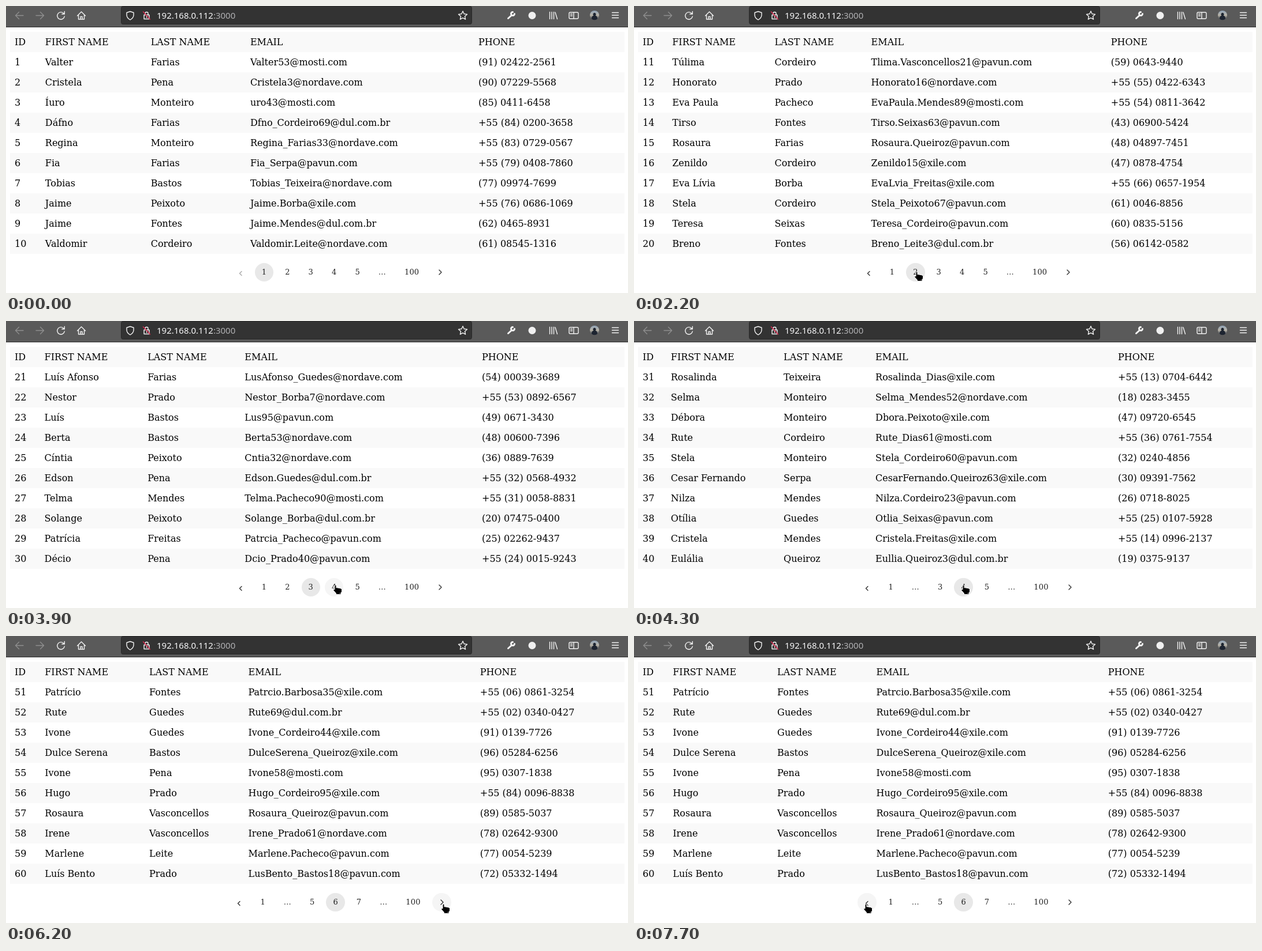
Animation, 1077 px wide and 498 px high, one loop 8000 ms. Source, as an HTML page:

```html
<!DOCTYPE html>
<html lang="en">
<head>
<meta charset="utf-8">
<title>Paginated table</title>
<style>
  html, body { margin: 0; width: 100%; height: 100%; overflow: hidden; background: #fff; }
  body { position: relative; font: 16px "DejaVu Serif", serif; color: #000; }
  body > * { position: absolute; }
  svg { display: block; overflow: visible; }
  #bar { left: 0; top: 0; }
  .line, #pager path { fill: none; stroke: #f2f2f2; stroke-width: 1.4; stroke-linecap: round; stroke-linejoin: round; }
  .dim { stroke: #8e8e8e; }
  #url { left: 261px; top: 6px; font: 15px/20px "Noto Sans", "Open Sans", sans-serif; color: #f9f9fa; }
  #url span { color: #b1b1b3; }
  table { left: 7px; top: 45px; width: 1064px; border-spacing: 0; }
  td { height: 35px; padding: 0 8px; line-height: 19px; white-space: nowrap; }
  tr:nth-child(odd) { background: #f9f9f9; }
  #pager { left: 81px; right: 0; top: 446px; display: flex; justify-content: center; }
  #pager span {
    height: 32px; margin: 0 4px; padding: 0 12px; border-radius: 16px;
    font-size: 13px; line-height: 31px; letter-spacing: .14px; color: #212121;
  }
  #pager .hover { background: #f5f5f5; }
  #pager .current { background: #e8e8e8; }
  #pager path { stroke: #333; }
  #pager .off path { stroke: #a8a8a8; }
  #pointer { left: 0; top: 0; }
</style>
</head>
<body>
<svg id="bar" width="1077" height="37">
  <defs>
    <linearGradient id="photo" x2="0" y2="1">
      <stop stop-color="#8fa3b8"/><stop offset=".5" stop-color="#b9b4a8"/><stop offset="1" stop-color="#2b3444"/>
    </linearGradient>
  </defs>
  <rect width="1077" height="37" fill="#5a5a5a"/>
  <rect y="36" width="1077" height="1" fill="#2c2c2c"/>
  <rect x="199.5" y=".5" width="607" height="31" rx="3" fill="#333" stroke="#292929"/>
  <path class="line dim" d="M30 16.5H16.5M22.5 10.5l-6 6 6 6M52 16.5h13.5M59.5 10.5l6 6-6 6"/>
  <!-- reload, home, shield, star -->
  <path class="line" d="M100 13A6.3 6.3 0 1 0 101.3 18M101.3 9.5v4.5h-4.5"/>
  <path class="line" d="M123.5 17l7-7 7 7M125.5 15.5V23h10v-7.5M129 23v-4.5h3V23"/>
  <path class="line" d="M215 9.5l6 2v4c0 4-2.5 6.5-6 8.5-3.5-2-6-4.5-6-8.5v-4z"/>
  <path class="line" d="M791 9l2.2 4.8 5.3.6-4 3.6 1.1 5.2-4.6-2.6-4.6 2.6 1.1-5.2-4-3.6 5.3-.6z"/>
  <!-- struck padlock, wrench -->
  <path class="line" d="M239 15.5h9v7h-9zM241 15v-2a2.5 2.5 0 0 1 5 0v2M243.5 18v2"/>
  <path class="line" style="stroke:#e22850" d="M237.5 10l12 13"/>
  <path class="line" style="stroke-width:3" d="M869.5 21.5l6-5.5M880.5 13.5A3 3 0 1 1 877.5 10.5"/>
  <circle cx="911" cy="16.5" r="6.5" fill="#f0f0f0"/>
  <!-- library, sidebar, menu -->
  <path class="line" d="M941.5 10.5v12m3.5-12v12m3.5-12v12M951 11l3.5 11.5"/>
  <path class="line" d="M977 11h12a2 2 0 0 1 2 2v7a2 2 0 0 1-2 2h-12a2 2 0 0 1-2-2v-7a2 2 0 0 1 2-2zM983 11v11M977.5 14h3m-3 3h3"/>
  <path class="line" d="M1049.5 11.5h11m-11 4.5h11m-11 4.5h11"/>
  <circle cx="1019" cy="16" r="8" fill="url(#photo)"/>
  <path fill="#1d2430" d="M1014 22c0-4 2-5 3.5-5.5a2.5 2.5 0 1 1 3 0c2 .5 3.5 2 3.5 5.5-3 3-7 3-10 0z"/>
</svg>
<div id="url">192.168.0.112<span>:3000</span></div>
<table id="table"></table>
<div id="pager"></div>
<svg id="pointer" width="20" height="20"></svg>
<script>
const LOOP = 8000, STEP = 100, LAST = 100;
const $ = id => document.getElementById(id);
const domains = { m: "mosti.com", v: "nordave.com", p: "pavun.com", x: "xile.com", d: "dul.com.br" };
const phoneForms = { a: "(##) 0###-####", b: "(##) 0####-####", c: "+55 (##) 0###-####" };

// One person per line: first name, last name, email with domain key, phone form
const people = `Valter,Farias,Valter53@m,b
Cristela,Pena,Cristela3@v,b
Íuro,Monteiro,uro43@m,a
Dáfno,Farias,Dfno_Cordeiro69@d,c
Regina,Monteiro,Regina_Farias33@v,c
Fia,Farias,Fia_Serpa@p,c
Tobias,Bastos,Tobias_Teixeira@v,b
Jaime,Peixoto,Jaime.Borba@x,c
Jaime,Fontes,Jaime.Mendes@d,a
Valdomir,Cordeiro,Valdomir.Leite@v,b
Túlima,Cordeiro,Tlima.Vasconcellos21@p,a
Honorato,Prado,Honorato16@v,c
Eva Paula,Pacheco,EvaPaula.Mendes89@m,c
Tirso,Fontes,Tirso.Seixas63@p,b
Rosaura,Farias,Rosaura.Queiroz@p,b
Zenildo,Cordeiro,Zenildo15@x,a
Eva Lívia,Borba,EvaLvia_Freitas@x,c
Stela,Cordeiro,Stela_Peixoto67@p,a
Teresa,Seixas,Teresa_Cordeiro@p,a
Breno,Fontes,Breno_Leite3@d,b
Luís Afonso,Farias,LusAfonso_Guedes@v,b
Nestor,Prado,Nestor_Borba7@v,c
Luís,Bastos,Lus95@p,a
Berta,Bastos,Berta53@v,b
Cíntia,Peixoto,Cntia32@v,a
Edson,Pena,Edson.Guedes@d,c
Telma,Mendes,Telma.Pacheco90@m,c
Solange,Peixoto,Solange_Borba@d,b
Patrícia,Freitas,Patrcia_Pacheco@p,b
Décio,Pena,Dcio_Prado40@p,c
Rosalinda,Teixeira,Rosalinda_Dias@x,c
Selma,Monteiro,Selma_Mendes52@v,a
Débora,Monteiro,Dbora.Peixoto@x,b
Rute,Cordeiro,Rute_Dias61@m,c
Stela,Monteiro,Stela_Cordeiro60@p,a
Cesar Fernando,Serpa,CesarFernando.Queiroz63@x,b
Nilza,Mendes,Nilza.Cordeiro23@p,a
Otília,Guedes,Otlia_Seixas@p,c
Cristela,Mendes,Cristela.Freitas@x,c
Eulália,Queiroz,Eullia.Queiroz3@d,a
Nestor,Pacheco,Nestor.Prado18@p,a
Ivone,Guedes,Ivone_Mendes@v,c
Luís Bento,Fontes,LusBento.Monteiro72@v,b
Teresa,Cordeiro,Teresa44@x,c
Hugo,Peixoto,Hugo_Serpa5@m,a
Solange,Teixeira,Solange.Farias@p,b
Edson,Vasconcellos,Edson_Leite31@d,c
Dulce Serena,Borba,DulceSerena.Freitas89@v,a
Décio,Bastos,Dcio80@v,b
Berta,Pena,Berta.Queiroz@x,c
Patrício,Fontes,Patrcio.Barbosa35@x,c
Rute,Guedes,Rute69@d,c
Ivone,Guedes,Ivone_Cordeiro44@x,a
Dulce Serena,Bastos,DulceSerena_Queiroz@x,b
Ivone,Pena,Ivone58@m,a
Hugo,Prado,Hugo_Cordeiro95@x,c
Rosaura,Vasconcellos,Rosaura_Queiroz@p,a
Irene,Vasconcellos,Irene_Prado61@v,b
Marlene,Leite,Marlene.Pacheco@p,a
Luís Bento,Prado,LusBento_Bastos18@p,b
Telma,Prado,Telma_Seixas27@p,b
Tobias,Monteiro,Tobias.Guedes@m,a
Rosalinda,Serpa,Rosalinda_Pacheco@v,c
Breno,Fontes,Breno84@d,a
Otília,Cordeiro,Otlia.Mendes12@x,c
Eva Paula,Bastos,EvaPaula_Teixeira@p,b
Zenildo,Peixoto,Zenildo.Farias@v,a
Selma,Freitas,Selma_Borba6@m,c
Valter,Queiroz,Valter.Dias39@x,b
Irene,Pena,Irene_Barbosa@p,a`.split("\n");

const forward = [2200, 3500, 4300, 5600, 6200, 6600], back = [7700];
const start = [452, 500];
const moves = [
  { from: 600, to: 900, x: 444, y: 460 },
  { from: 1700, to: 1900, x: 484, y: 460 },
  { from: 2800, to: 3300, x: 511, y: 458 },
  { from: 3700, to: 3900, x: 565, y: 457 },
  { from: 4600, to: 5200, x: 752, y: 464 },
  { from: 6700, to: 7400, x: 396, y: 464 }
];

const passed = (times, t) => times.filter(time => time <= t).length;

// Eased moves, sampled in steps; longer ones sag further
function pointerAt(t) {
  const tick = Math.floor(t / STEP) * STEP + STEP;
  let [x, y] = start;
  for (const move of moves) {
    const k = Math.min(1, Math.max(0, (tick - move.from) / (move.to - move.from + STEP)));
    const ease = k * k * (3 - 2 * k), dx = move.x - x;
    x += dx * ease;
    y += (move.y - y) * ease + (dx / 70) ** 2 * Math.sin(Math.PI * ease);
    if (k < 1) break;
  }
  return [Math.round(x), Math.round(y)];
}

function phone(form, seed) {
  return phoneForms[form].replace(/#/g, () => {
    seed = (seed * 16807 + 11) % 2147483647;
    return Math.floor(seed / 97) % 10;
  });
}

function drawTable(page) {
  const offset = (page - 1) * 10;
  const rows = people.slice(offset, offset + 10).map((line, i) => {
    const id = offset + i + 1;
    const [first, last, email, form] = line.split(",");
    return [id, first, last, email.replace(/@(.)/, (_, key) => "@" + domains[key]), phone(form, id * 7919)];
  });
  rows.unshift(["ID", "FIRST NAME", "LAST NAME", "EMAIL", "PHONE"]);
  $("table").innerHTML = rows.map(cells => `<tr><td>${cells.join("<td>")}`).join("");
}

const chevron = d => `<svg width="9" height="32"><path d="${d}"/></svg>`;
const icons = { "‹": chevron("M6 14.5l-3.5 3.5 3.5 3.5"), "›": chevron("M3 12l4 4-4 4") };

function drawPager(page) {
  const middle = page < 4 ? [2, 3, 4, 5] : ["…", page - 1, page, page + 1];
  $("pager").innerHTML = ["‹", 1, ...middle, "…", LAST, "›"].map(label => {
    const off = label === "…" || (label === "‹" && page === 1);
    const kind = label === page ? "current" : off ? "off" : "";
    return `<span class="${kind}">${icons[label] || label}</span>`;
  }).join("");
}

const hand = `<path fill="#000" stroke="#fff" d="M4 2q1.500-2 3 0v4q1.500-1 2.500.3 1.500-1 2.500.4 1.500-.8 2.500.5
  2-.3 2 1.500v4l-1.500 2v2.800H6.500v-2L2 10.500q-.8-2 1-2L4 9z"/><path stroke="#fff" d="M12.500 15.500h1"/>`;
const arrow = `<path fill="#000" stroke="#fff" d="M.5.5v14l3.300-3 2.200 5 2.300-1-2.200-4.800h4.400z"/>`;

function drawPointer(x, y) {
  const tipX = x + 5, tipY = y + 1;
  const over = [...$("pager").children].find(item => {
    const box = item.getBoundingClientRect();
    const inside = tipX > box.left && tipX < box.right && tipY > box.top && tipY < box.bottom;
    return inside && !item.matches(".off");
  });
  if (over) over.classList.add("hover");
  $("pointer").innerHTML = over ? hand : arrow;
  $("pointer").style.transform = `translate(${x}px, ${y}px)`;
}

let shown = "";
function frame(now) {
  const t = now % LOOP;
  const page = 1 + passed(forward, t) - passed(back, t);
  const [x, y] = pointerAt(t);
  const key = [page, x, y].join();
  if (key !== shown) {
    shown = key;
    drawTable(page);
    drawPager(page);
    drawPointer(x, y);
  }
  requestAnimationFrame(frame);
}
frame(0);
</script>
</body>
</html>
```
